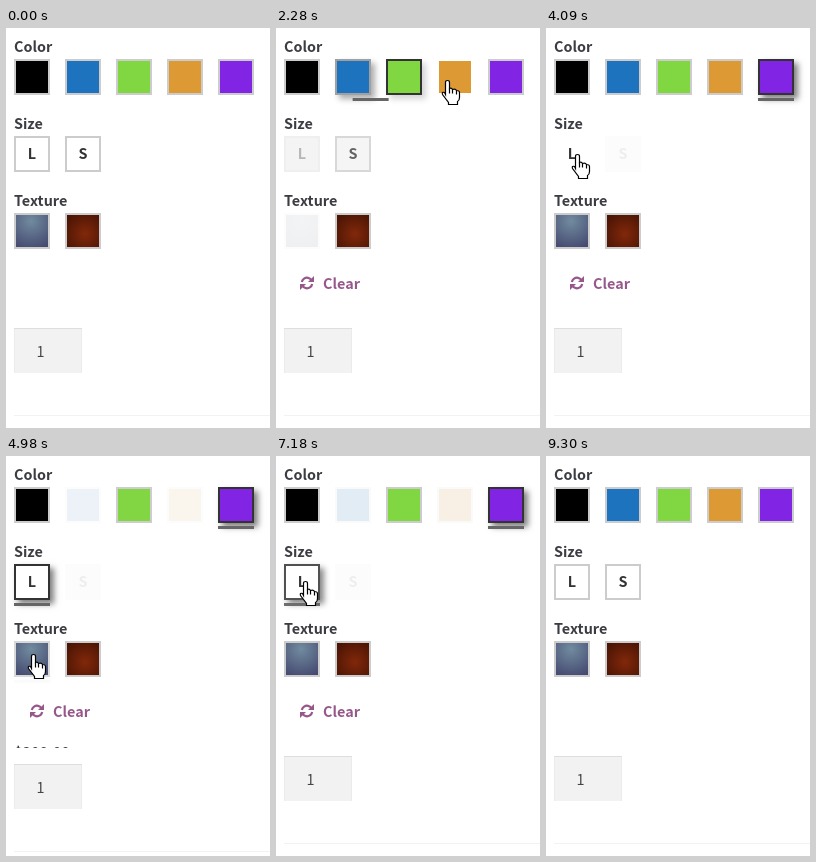
An HTML page with a canvas that plays this animation: 264x400 px, repeating every 9.58 s.

```html
<!DOCTYPE html>
<html lang="en">
<head>
<meta charset="utf-8">
<title>Product variation swatches</title>
<style>
html, body { margin: 0; height: 100%; overflow: hidden; background: #fff; }
canvas { display: block; }
</style>
</head>
<body>
<canvas id="stage" width="264" height="400"></canvas>
<script>
const ctx = document.getElementById('stage').getContext('2d');
const LOOP = 9580, INK = '#3c3d43', SIZE = 36, PITCH = 51;
const FONT = '14.4px "Noto Sans CJK SC", "Noto Sans CJK JP", "Noto Sans CJK", "Noto Sans", sans-serif';

const groups = [
  { label: 'Color', y: 31, items: ['#000', '#1e73be', '#81d742', '#dd9933', '#8224e3'] },
  { label: 'Size', y: 108, items: ['L', 'S'] },
  { label: 'Texture', y: 185, items: ['denim', 'leather'] }
];

// Purchasable combinations: [color, size, texture]
const variants = [[0, 0, 0], [1, 1, 1], [2, 0, 1], [3, 1, 0], [4, 0, 0], [4, 0, 1]];

// Clicks: [time, group, option], -1 deselects
const clicks = [
  [500, 0, 0], [1415, 0, 1], [2050, 0, 2], [2480, 0, 3], [3370, 0, 4], [4300, 1, 0],
  [4932, 2, 0], [6290, 2, -1], [7080, 1, -1], [8150, 0, -1]
];
const states = [{ time: 0, sel: [-1, -1, -1], last: [0, 0, 0] }];
for (const [time, g, i] of clicks) {
  const { sel, last } = states[states.length - 1];
  const next = { time, sel: [...sel], last: [...last] };
  next.sel[g] = i;
  if (i >= 0) next.last[g] = i;
  states.push(next);
}

// Pointer path: [time, x, y]
const path = [
  [110, 92, 150], [380, 28, 52], [640, 28, 52], [1050, 77, 52], [1560, 79, 51], [1640, 79, 51],
  [1930, 129, 52], [2080, 129, 52], [2350, 180, 52], [2540, 180, 52], [2950, 235, 57],
  [3400, 236, 56], [4130, 29, 127], [4450, 29, 127], [4820, 27, 198], [5000, 27, 198],
  [5630, 27, 205], [6267, 27, 210], [6400, 27, 210], [6910, 30, 138], [7100, 29, 125],
  [7260, 29, 125], [7900, 242, 52], [8270, 242, 52], [8950, 210, 338], [9300, 128, 400]
];

const runs = [
  [110, 1010, 11], [1110, 2010, 11], [2090, 3010, 11], [3090, 3280, 3], [3460, 4360, 11],
  [4450, 5350, 11], [5630, 6540, 11], [6640, 6910, 4], [7080, 7960, 11], [8060, 8950, 11],
  [9040, 9300, 4]
];

const hand = new Path2D('M-2 14V2q0-2 2-2t2 2v6q2-1 3 1q3-1 4 1q3 0 3 2v5q0 3-2 4v3h-9v-2l-6-8q-1-3 2-2z');
const knuckles = new Path2D('M2 8v5M5 9v4M9 10v4');
const arrow = new Path2D('M0 0v17l4-4l3 6l2-1l-3-6h5z');

const ease = p => (1 - Math.cos(Math.PI * Math.max(0, Math.min(1, p)))) / 2;

function snap(t) {
  const run = runs.filter(r => t >= r[0]).pop();
  if (!run) return 0;
  const [start, end, n] = run, step = (end - start) / (n - 1);
  return start + step * Math.min(n - 1, Math.floor((t - start) / step + 0.2));
}

// Value that eases to a new target after each click
function track(t, target, rise, fall = rise) {
  let v = target(states[0]);
  for (let i = 1; i < states.length && states[i].time <= t; i++) {
    const end = i + 1 < states.length ? Math.min(t, states[i + 1].time) : t;
    const goal = target(states[i]);
    v += (goal - v) * ease((end - states[i].time) / (goal > v ? rise : fall));
  }
  return v;
}

function pointerAt(t) {
  const k = path.findIndex(p => p[0] > t);
  if (k < 1) return null;
  const [t0, x0, y0] = path[k - 1], [t1, x1, y1] = path[k];
  const p = ease((t - t0) / (t1 - t0));
  return { x: x0 + (x1 - x0) * p, y: y0 + (y1 - y0) * p };
}

const available = (sel, g, i) =>
  variants.some(v => v[g] === i && sel.every((s, k) => k === g || s < 0 || s === v[k]));

function text(str, x, y, color = INK, weight = 'bold', align = 'left') {
  ctx.font = weight + ' ' + FONT;
  ctx.textAlign = align;
  ctx.fillStyle = color;
  ctx.fillText(str, x, y);
}

function box(color, x, y, w, h) {
  ctx.fillStyle = color;
  ctx.fillRect(x, y, w, h);
}

function radial(x, y, r, inner, outer) {
  const g = ctx.createRadialGradient(x, y, 0, x, y, r);
  g.addColorStop(0, inner);
  g.addColorStop(1, outer);
  return g;
}

function swatch(t, g, i, over) {
  const { y, items } = groups[g], x = 8 + PITCH * i, item = items[i];
  const isOn = s => +(s.sel[g] === i);
  const shadow = track(t, isOn, 560), dark = track(t, isOn, 200, 350);
  const from = over ? 255 : 204, shade = Math.round(from + (51 - from) * dark);

  ctx.save();
  ctx.globalAlpha = track(t, s => available(s.sel, g, i) ? 1 : 0.07, 650);
  ctx.save();
  if (shadow > 0.01) {
    ctx.shadowColor = `rgba(0,0,0,${0.5 * shadow})`;
    ctx.shadowBlur = 6;
    ctx.shadowOffsetX = ctx.shadowOffsetY = 4;
  }
  box(`rgb(${shade},${shade},${shade})`, x, y, SIZE, SIZE);
  ctx.restore();

  const fill = g === 0 ? item : g === 1 ? '#fff'
    : i === 0 ? radial(x + 17, y + 8, 29, '#718b9f', '#454a70')
    : radial(x + 20, y + 21, 25, '#81280a', '#461304');
  box(fill, x + 2, y + 2, SIZE - 4, SIZE - 4);
  if (g === 1) text(item, x + 18, y + 23, '#333', 'bold', 'center');
  ctx.restore();
}

function clearLink() {
  const color = '#96588a';
  ctx.save();
  ctx.translate(31, 255);
  ctx.strokeStyle = ctx.fillStyle = color;
  ctx.lineWidth = 2.2;
  for (let k = 0; k < 2; k++) {
    ctx.beginPath();
    ctx.arc(0, 0, 5.3, Math.PI + 0.2, Math.PI * 2 - 0.6);
    ctx.stroke();
    ctx.beginPath();
    ctx.moveTo(7, -7);
    ctx.lineTo(7, -1);
    ctx.lineTo(1, -1);
    ctx.fill();
    ctx.rotate(Math.PI);
  }
  ctx.restore();
  text('Clear', 47, 261, color);
}

function pointer({ x, y }, over) {
  ctx.save();
  ctx.translate(Math.round(x) + 0.5, Math.round(y) + 0.5);
  ctx.fillStyle = '#fff';
  ctx.strokeStyle = '#000';
  ctx.lineWidth = 1.2;
  const shape = over ? hand : arrow;
  ctx.fill(shape);
  ctx.stroke(shape);
  if (over) ctx.stroke(knuckles);
  ctx.restore();
}

function draw(t) {
  box('#fff', 0, 0, 264, 400);
  const tip = t < 9300 && pointerAt(t);
  let hovering = false;

  groups.forEach(({ label, y, items }, g) => {
    text(label, 8, y - 7);
    items.forEach((_, i) => {
      const dx = tip ? tip.x - 8 - PITCH * i : -1, dy = tip ? tip.y - y : -1;
      const over = dx >= 0 && dx < SIZE && dy >= 0 && dy < SIZE;
      hovering = hovering || over;
      swatch(t, g, i, over);
    });
    ctx.globalAlpha = track(t, s => +(s.sel[g] >= 0), 560);
    box('#666', 8 + PITCH * track(t, s => s.last[g], 560), y + 39, SIZE, 3);
    ctx.globalAlpha = 1;
  });

  const { sel } = states.filter(s => s.time <= t).pop();
  if (sel.some(i => i >= 0)) clearLink();

  // The price slides open and pushes the quantity field down
  const drop = 41 * track(t, s => +s.sel.every(i => i >= 0), 200);
  ctx.save();
  ctx.beginPath();
  ctx.rect(0, 284, 264, drop);
  ctx.clip();
  text('$200.00', 8, 302);
  ctx.restore();

  const top = Math.round(300 + drop);
  box('#f2f2f2', 8, top, 68, 45);
  box('#dedede', 8, top, 68, 1);
  box('#ebebeb', 8, top + 1, 1, 44);
  box('#ebebeb', 75, top + 1, 1, 44);
  text('1', 34.5, top + 29, '#43454b', 'normal', 'center');
  box('#f2f2f2', 8, top + 87, 256, 1);

  if (tip) pointer(tip, hovering);
}

const begin = performance.now();
function frame() {
  draw(snap((performance.now() - begin) % LOOP));
  requestAnimationFrame(frame);
}
frame();
</script>
</body>
</html>
```
